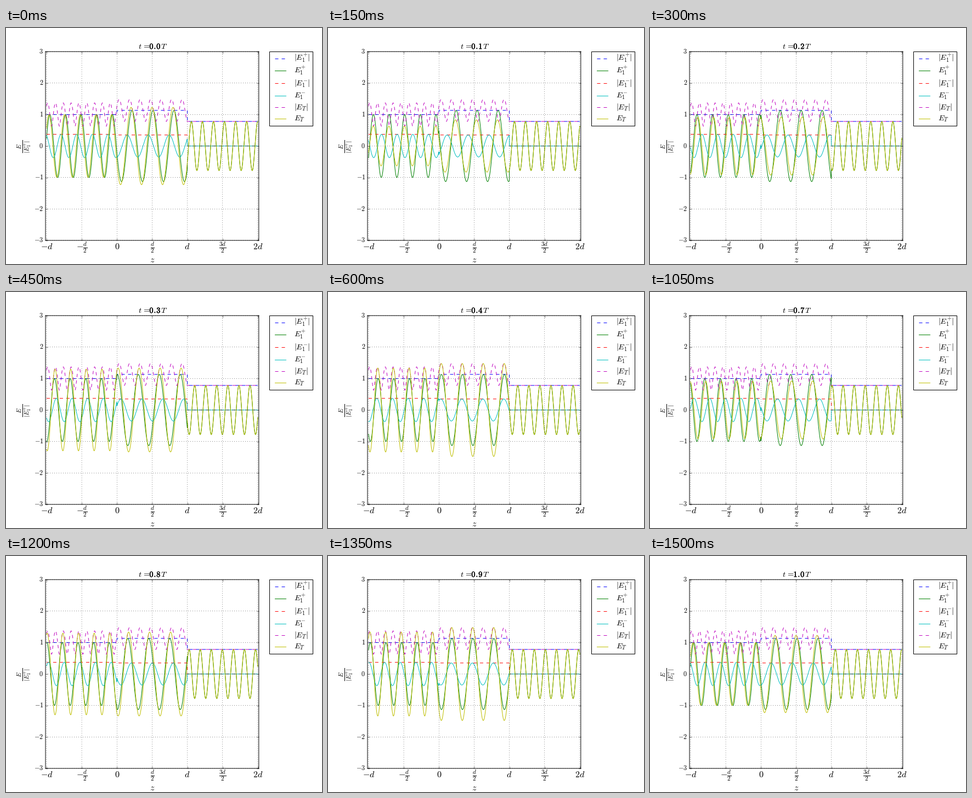
These frames come from a looping animation (576 by 432 pixels, 1.65 s). A matplotlib script:

```python
import numpy as np
import matplotlib.pyplot as plt
from matplotlib.animation import FuncAnimation
from matplotlib.patches import Rectangle
from matplotlib.patheffects import withStroke

plt.style.use("classic")
plt.rcParams.update({"savefig.dpi": "figure", "mathtext.fontset": "cm"})

WIDTH, HEIGHT = 576, 432
STEPS, INTERVAL = 11, 150

# Wavelengths per layer thickness d in the three media (index ratio squared 9:5:18)
K1, K2, K3 = np.sqrt([20.25, 11.25, 40.5])


def cross(forward, backward, k_left, k_right):
    """Amplitudes just left of an interface from those just right of it."""
    plus, minus = k_left + k_right, k_left - k_right
    return ((plus * forward + minus * backward) / (2 * k_left),
            (minus * forward + plus * backward) / (2 * k_left))


def wave(k, z):
    return np.exp(2j * np.pi * k * z)


def layered_fields(z):
    """Complex forward and backward waves; zero phase at z = 2d, unit incidence."""
    f2, b2 = cross(wave(K3, -1), 0, K2, K3)
    f1, b1 = cross(f2 * wave(K2, -1), b2 * wave(K2, 1), K1, K2)
    regions = [z < 0, z < 1]
    forward = np.select(regions, [f1 * wave(K1, z), f2 * wave(K2, z - 1)],
                        wave(K3, z - 2))
    backward = np.select(regions, [b1 * wave(K1, -z), b2 * wave(K2, 1 - z)], 0)
    return forward / abs(f1), backward / abs(f1)


fig = plt.figure(figsize=(WIDTH / 72, HEIGHT / 72), dpi=72, facecolor="white")
ax = fig.add_axes([0.125, 0.1, 0.675, 0.8])
ax.set(xlim=(-1.015, 2.015), ylim=(-3, 3),
       xticks=np.arange(-1, 2.1, 0.5), yticks=range(-3, 4))
ax.set_xticklabels([])
ax.set_yticklabels([])
ax.grid(True)
for rule in [*ax.spines.values(), *ax.get_xgridlines(), *ax.get_ygridlines()]:
    rule.set_snap(False)

# Overlay in pixel coordinates, origin at the top left
page = fig.add_axes([0, 0, 1, 1])
page.set(xlim=(0, WIDTH), ylim=(HEIGHT, 0))
page.axis("off")


def label(x, y, text, size, ha="center", **kwargs):
    return page.text(x, y, f"${text}$", fontsize=size, ha=ha, va="baseline", **kwargs)


tick_names = ["-d", r"-\frac{d}{2}", "0", r"\frac{d}{2}", "d", r"\frac{3d}{2}", "2d"]
for i, name in enumerate(tick_names):
    label(74 + 64.16 * i, 405, name, 16)
for value in range(-3, 4):
    label(68, 216 - 57.6 * value + 3.6, value, 12, ha="right")
label(266.4, 429, "z", 16)
label(34.3, 216.4, r"\frac{E}{|E_1^{+}|}", 16, rotation=90, rotation_mode="anchor")

label(240.6, 38.2, r"t\hspace{0.116}=", 14.4, ha="left")
clock = label(261.3, 38.2, "0", 14.4, ha="left",
              path_effects=[withStroke(linewidth=0.4, foreground="black")])
label(282, 38.2, "T", 14.4, ha="left")

z = np.linspace(-1, 2, 3001)
forward, backward = layered_fields(z)

# name, colour, complex field, drawn as magnitude, height in the legend
curves = [
    ("|E_1^{+}|", "b", forward, True, 55.8),
    ("E_1^{+}", "g", forward, False, 78.3),
    ("|E_1^{-}|", "r", backward, True, 101),
    ("E_1^{-}", "c", backward, False, 123.7),
    ("|E_T|", "m", forward + backward, True, 145.2),
    ("E_T", "y", forward + backward, False, 165.8),
]

page.add_patch(Rectangle((480.2, 43.2), 79.1, 135.6, fc="white", ec="black", lw=1))
moving = []
for name, color, field, is_magnitude, y in curves:
    style = dict(color=color, lw=1, ls=(0, (6, 6)) if is_magnitude else "-")
    line, = ax.plot(z, abs(field) if is_magnitude else field.real, **style)
    if not is_magnitude:
        moving.append((line, field))
    page.plot([490.3, 510.4], [y, y], **style)
    label(524.8, y + 4, name, 14.4, ha="left")
ax.set(xlim=(-1.015, 2.015), ylim=(-3, 3))
page.set(xlim=(0, WIDTH), ylim=(HEIGHT, 0))


def update(step):
    t = step / 10
    for line, field in moving:
        line.set_ydata((field * np.exp(-2j * np.pi * t)).real)
    whole, tenths = divmod(step, 10)
    clock.set_text(rf"$\mathbf{{{whole}\hspace{{0.066}}.\hspace{{-0.134}}{tenths}}}$")
    return [line for line, _ in moving] + [clock]


anim = FuncAnimation(fig, update, frames=STEPS, interval=INTERVAL,
                     repeat=True, repeat_delay=0, blit=False)
plt.show()
```
